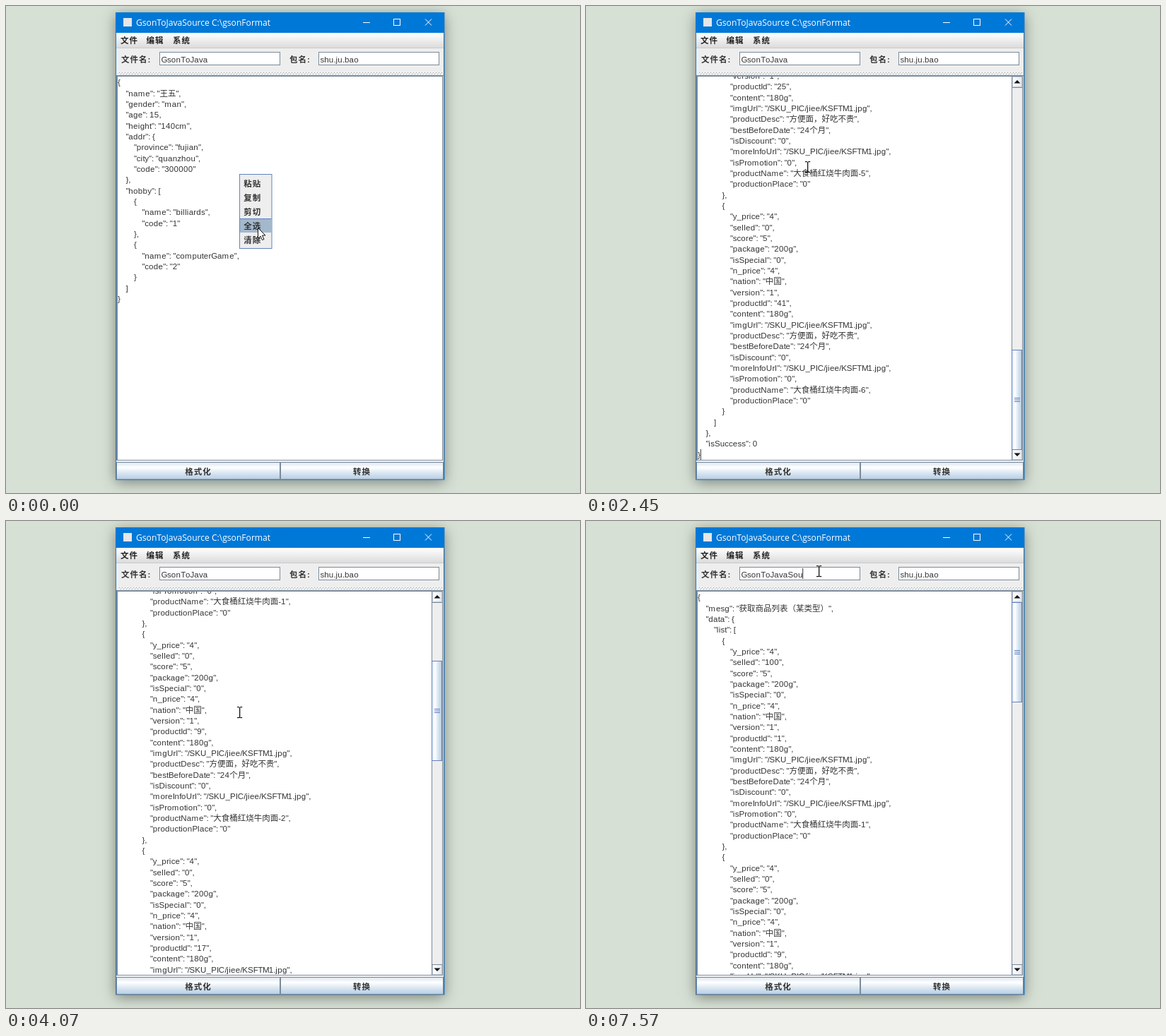
An HTML page with a canvas for the animation above (8 s loop, 812x690 px).

```html
<!DOCTYPE html>
<html lang="zh">
<head>
<meta charset="utf-8">
<title>GsonToJavaSource</title>
<style>
html, body { margin: 0; width: 100%; height: 100%; overflow: hidden; background: #d6e0d4; }
canvas { display: block; }
</style>
</head>
<body>
<canvas id="stage" width="812" height="690"></canvas>
<script>
const ctx = document.getElementById('stage').getContext('2d', { alpha: false });
const LOOP = 8000;
const SCALE = 23 / 24;            // the window is shown slightly reduced
const LINE = 16 * SCALE;
const VIEW = { x: 158, y: 100, right: 617, bottom: 643 };
const MAX_SCROLL = 1420;
const BLUE = '#0078d7', EDGE = '#7a8a99', ACCENT = '#6382bf', PANEL = '#eee', INK = '#333';
const FAMILY = '"Liberation Sans", "Noto Sans CJK SC", "Noto Sans CJK", sans-serif';

const person = {
  name: '王五', gender: 'man', age: 15, height: '140cm',
  addr: { province: 'fujian', city: 'quanzhou', code: '300000' },
  hobby: [{ name: 'billiards', code: '1' }, { name: 'computerGame', code: '2' }]
};
const product = (id, i) => ({
  y_price: '4', selled: i ? '0' : '100', score: '5', package: '200g', isSpecial: '0',
  n_price: '4', nation: '中国', version: '1', productId: String(id), content: '180g',
  imgUrl: '/SKU_PIC/jiee/KSFTM1.jpg', productDesc: '方便面，好吃不贵',
  bestBeforeDate: '24个月', isDiscount: '0', moreInfoUrl: '/SKU_PIC/jiee/KSFTM1.jpg',
  isPromotion: '0', productName: '大食桶红烧牛肉面-' + (i + 1), productionPlace: '0'
});
const catalog = {
  mesg: '获取商品列表（某类型）',
  data: { list: [1, 9, 17, 25, 25, 41].map(product) },
  isSuccess: 0
};
const toLines = doc => JSON.stringify(doc, null, 4).split('\n');
const personLines = toLines(person), catalogLines = toLines(catalog);

// Timelines: [start ms, ...values], held until the next row.
const pointer = [
  [0, 'arrow', 356, 314], [400, 'beam', 357, 314], [710, 'beam', 326, 259], [830, 'beam', 301, 213],
  [980, 'arrow', 298, 211], [1380, 'arrow', 303, 218], [1530, 'arrow', 307, 222],
  [1650, 'arrow', 310, 226], [2170, 'beam', 312, 228], [2970, 'beam', 321, 250],
  [3090, 'beam', 329, 271], [4770, 'beam', 329, 202], [4930, 'beam', 337, 117],
  [5080, 'beam', 332, 85], [5200, 'beam', 328, 71]
];
const popup = [[0, 330, 238, 3], [400], [980, 298, 211, -1], [1380, 298, 211, 0], [2450]];
const scroll = [
  [0, MAX_SCROLL, MAX_SCROLL], [2850, 1374, 1374], [2970, 1236, 1236], [3090, 1144, 1144],
  [3370, 1006, 1052], [3520, 868, 868], [3650, 730, 730], [3800, 592, 592],
  [3920, 454, 454], [4070, 316, 316], [4220, 40, 40], [4500, 0, 0]
];
const field = [
  [0, 'GsonToJava', false], [5350, 'GsonToJava', true], [5780, 'GsonToJava', false],
  [6310, 'GsonToJava', true], [6740, 'GsonToJava', false], [6860, 'GsonToJavaS', true],
  [7260, 'GsonToJavaSo', true], [7570, 'GsonToJavaSou', true]
];
const phase = [[0, 'plain'], [400, 'selectedCaret'], [980, 'selected'], [2450, 'catalog']];
const at = (rows, t) => rows.filter(row => row[0] <= t).pop();

const advances = {};
function advance(ch, bold) {
  const key = ch + bold;
  if (!(key in advances)) {
    ctx.font = (bold ? 'bold ' : '') + '1200px ' + FAMILY;
    const cjk = ch.charCodeAt(0) > 0x2e80;
    // Whole-pixel advances of hinted 12px text.
    const units = cjk ? (bold ? 13 : 12)
      : !bold && ch === 'm' ? 11 : !bold && ch === 'M' ? 9
      : Math.round(ctx.measureText(ch).width / 100);
    advances[key] = units * SCALE;
  }
  return advances[key];
}
const textWidth = (s, bold = false) => [...s].reduce((w, ch) => w + advance(ch, bold), 0);
function text(s, x, y, bold = false, color = INK) {
  const widths = [...s].map(ch => advance(ch, bold));
  ctx.font = (bold ? 'bold ' : '') + 12 * SCALE + 'px ' + FAMILY;
  ctx.fillStyle = color;
  [...s].forEach((ch, i) => {
    if (ch !== ' ') ctx.fillText(ch, x, y);
    x += widths[i];
  });
}
function rect(x, y, w, h, color) {
  ctx.fillStyle = color;
  ctx.fillRect(x, y, w, h);
}
function box(x, y, w, h, fill, edge) {
  rect(x, y, w, h, edge);
  rect(x + 1, y + 1, w - 2, h - 2, fill);
}
function path(points, fill, stroke, close = true) {
  ctx.beginPath();
  points.forEach(([x, y]) => ctx.lineTo(x, y));
  if (close) ctx.closePath();
  if (fill) { ctx.fillStyle = fill; ctx.fill(); }
  if (stroke) { ctx.strokeStyle = stroke; ctx.lineWidth = 1; ctx.stroke(); }
}
function gradient(x0, y0, x1, y1, ...stops) {
  const g = ctx.createLinearGradient(x0, y0, x1, y1);
  stops.forEach(([offset, color]) => g.addColorStop(offset, color));
  return g;
}
const ocean = (x0, y0, x1, y1) =>
  gradient(x0, y0, x1, y1, [0, '#dde8f3'], [0.3, '#fff'], [0.6, '#dde8f3'], [1, '#b8cfe5']);

function drawTitleBar() {
  rect(155, 9, 465, 29, BLUE);
  rect(166, 17, 12, 12, '#e4e6e8');
  ctx.font = '12.1px "Open Sans", "Noto Sans", sans-serif';
  ctx.fillStyle = '#fff';
  ctx.fillText('GsonToJavaSource C:\\gsonFormat', 184, 28);
  rect(505, 23, 10, 1, '#fff');
  ctx.strokeStyle = '#fff';
  ctx.lineWidth = 1;
  ctx.strokeRect(548.5, 18.5, 9, 9);
  path([[593, 18.5], [602, 27.5]], null, '#fff', false);
  path([[602, 18.5], [593, 27.5]], null, '#fff', false);
}
function drawTools(name, caret) {
  rect(156, 38, 463, 22, gradient(0, 38, 0, 60, [0, '#fff'], [1, '#dadada']));
  rect(156, 59, 463, 1, '#ccc');
  [['文件', 162], ['编辑', 198.5], ['系统', 236]].forEach(([s, x]) => text(s, x, 53.3, true, '#222'));
  text('文件名:', 163, 80, true);
  text('包名:', 401, 80, true);
  box(217, 65, 171, 19, '#fff', EDGE);
  box(442, 65, 171, 19, '#fff', EDGE);
  text(name, 219.4, 79.5);
  text('shu.ju.bao', 444.4, 79.5);
  if (caret) rect(219 + textWidth(name), 67, 1, 15, INK);
  for (let row = 0; row < 3; row++) {
    for (let x = 160 + row % 2 * 2; x < 617; x += 4) {
      rect(x - 1, 93 + row * 2, 1, 1, '#fff');
      rect(x, 94 + row * 2, 1, 1, '#8a98a6');
    }
  }
}
function drawButton(label, x, w) {
  box(x, 646, w, 25, ocean(0, 647, 0, 670), EDGE);
  text(label, x + (w - textWidth(label, true)) / 2, 664, true);
}
function drawWindow(name, caret) {
  rect(0, 0, 812, 690, '#d6e0d4');
  ctx.save();
  ctx.shadowColor = 'rgba(0,0,0,.42)';
  ctx.shadowBlur = 18;
  ctx.shadowOffsetY = 4;
  rect(155, 9, 465, 662, BLUE);
  ctx.restore();
  rect(155, 9, 465.5, 662.5, '#2f78b8');
  rect(156, 38, 463, 633, PANEL);
  drawTitleBar();
  drawTools(name, caret);
  rect(156, 98, 463, 547, EDGE);
  rect(158, 100, 460, 544, '#fff');
  rect(617, 99, 1, 545, EDGE);
  rect(618, 99, 1, 546, '#dfe5ea');
  rect(157, 643, 461, 1, EDGE);
  rect(156, 644, 463, 1, '#fff');
  drawButton('格式化', 156, 232);
  drawButton('转换', 388, 231);
}
function drawText(lines, offset, selected, caret) {
  ctx.save();
  ctx.beginPath();
  ctx.rect(VIEW.x - 1, VIEW.y, VIEW.right - VIEW.x, VIEW.bottom - VIEW.y);
  ctx.clip();
  lines.forEach((line, i) => {
    const top = VIEW.y + 0.5 + i * LINE - offset;
    if (top < VIEW.y - LINE || top > VIEW.bottom) return;
    if (selected) rect(VIEW.x, top, textWidth(line), LINE + 0.3, '#b8cfe5');
    text(line, VIEW.x, top + 11.8);
    if (caret && i === lines.length - 1) rect(VIEW.x + textWidth(line), top, 1, LINE, INK);
  });
  ctx.restore();
}
function drawArrowButton(y, direction) {
  box(603, y, 14, 15, gradient(603, 0, 617, 0, [0, '#fff'], [1, '#e4e9ee']), '#c3ccd5');
  const mid = y + 7.5;
  path([[605.5, mid + 2 * direction * -1], [614.5, mid - 2 * direction], [610, mid + 2.5 * direction]], '#111');
}
function drawScrollbar(offset) {
  rect(602, 100, 15, 543, PANEL);
  rect(602, 100, 1, 543, EDGE);
  drawArrowButton(100, -1);
  drawArrowButton(628, 1);
  rect(603, 115, 14, 1, EDGE);
  rect(603, 628, 14, 1, EDGE);
  const y = Math.round(115 + offset / MAX_SCROLL * 372);
  box(602, y, 15, 142, ocean(603, 0, 616, 0), ACCENT);
  for (let i = 0; i < 3; i++) {
    rect(606, y + 68 + i * 2.5, 8, 1, ACCENT);
  }
}
function drawPopup(x, y, active) {
  box(x, y, 46.5, 106, PANEL, ACCENT);
  ['粘贴', '复制', '剪切', '全选', '清除'].forEach((label, i) => {
    const top = y + 4 + i * 20;
    if (i === active) {
      rect(x + 1, top, 44.5, 19, '#a3b8cc');
      rect(x + 1, top - 1, 44.5, 1, ACCENT);
    }
    text(label, x + 6.3, top + 14.4, true);
  });
}
function drawPointer(kind, x, y) {
  ctx.save();
  ctx.translate(x, y);
  if (kind === 'arrow') {
    path([[0.5, 0.5], [0.5, 15.5], [4, 12], [6.5, 17.5], [9, 16.5], [6.5, 11], [11, 11]], '#fff', '#111');
  } else {
    rect(1, -7, 1.3, 15, '#111');
    [-8, 7].forEach(dy => {
      rect(-2, dy, 3, 1.2, '#111');
      rect(2.2, dy, 3, 1.2, '#111');
    });
  }
  ctx.restore();
}
function draw(t) {
  const [, name, fieldCaret] = at(field, t);
  const [, offset, thumb] = at(scroll, t);
  const [, stage] = at(phase, t);
  const [, menuX, menuY, active] = at(popup, t);
  drawWindow(name, fieldCaret);
  if (stage === 'catalog') {
    drawText(catalogLines, offset, false, t < 2850);
    drawScrollbar(thumb);
  } else {
    drawText(personLines, 0, stage !== 'plain', stage === 'selectedCaret');
  }
  if (menuX) drawPopup(menuX, menuY, active);
  drawPointer(...at(pointer, t).slice(1));
}

const timelines = [pointer, popup, scroll, field, phase];
let shown = '';
function tick(now) {
  const t = now % LOOP;
  const key = timelines.map(rows => at(rows, t)[0]).join();
  if (key !== shown) {
    shown = key;
    draw(t);
  }
  requestAnimationFrame(tick);
}
draw(0);
requestAnimationFrame(tick);
</script>
</body>
</html>
```
